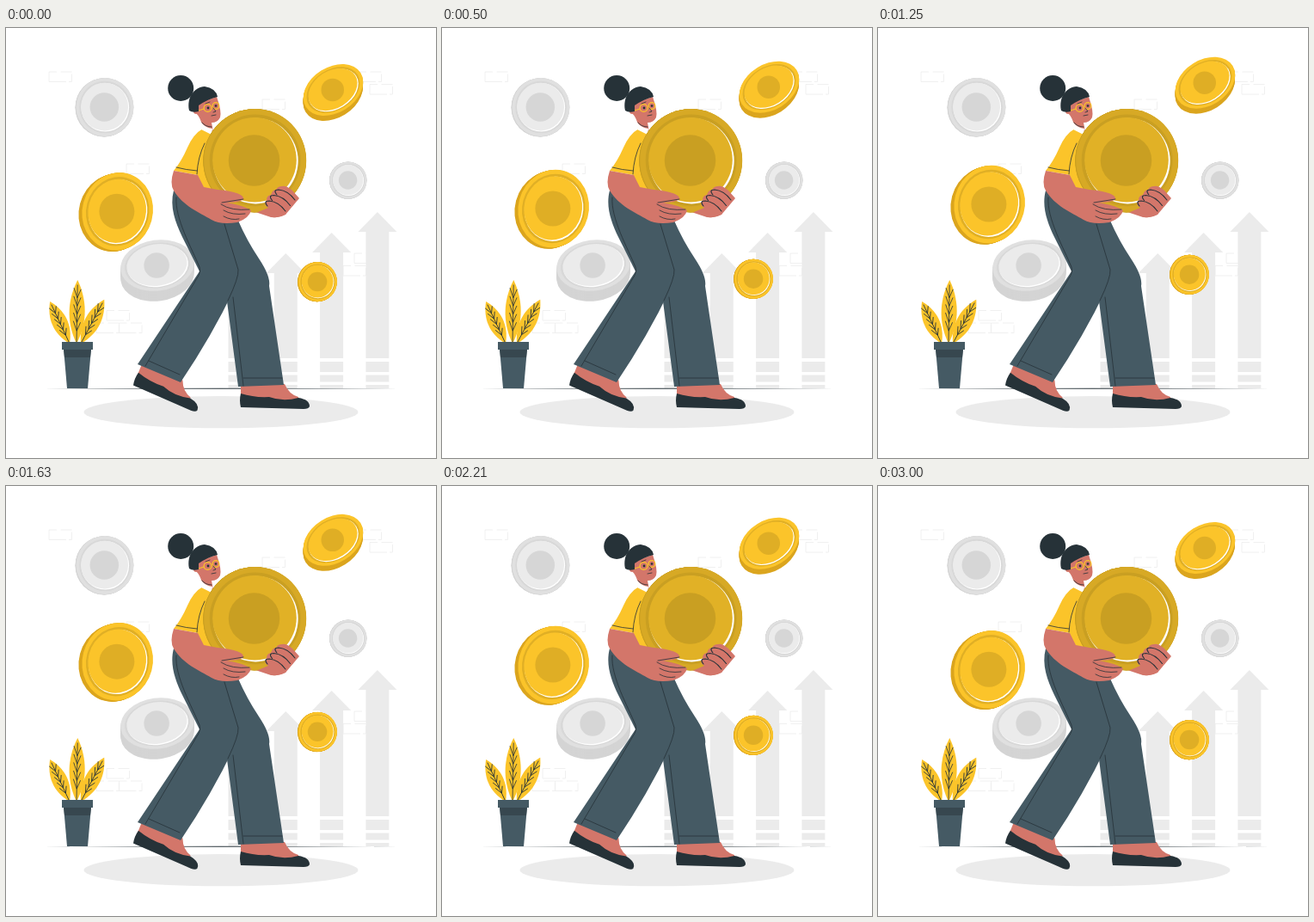
Recreate the animation shown at these times as an HTML page. Size 500 by 500 pixels, loop 3040 ms.

```html
<!DOCTYPE html>
<html lang="en">
<head>
<meta charset="utf-8">
<title>Carrying coins</title>
<style>
html, body { margin: 0; width: 100%; height: 100%; overflow: hidden; background: #fff; }
svg { display: block; width: 100%; height: 100%; }
.line { fill: none; stroke: #263238; stroke-width: .8; stroke-linecap: round; stroke-linejoin: round; }
.dark { fill: #263238; }
.skin { fill: #d3766a; }
.gold { fill: #fbc42a; }
.slate { fill: #455a64; }
.pale { fill: #ebebeb; }
</style>
</head>
<body>
<svg viewBox="0 0 500 500">
  <g id="bricks" fill="none" stroke="#ededed" stroke-width=".8"></g>
  <g id="arrows" class="pale"></g>
  <ellipse class="pale" cx="250" cy="446.7" rx="159.5" ry="18.6"/>
  <path class="dark" d="M43 419.2 250 418.8 457 419.2 250 419.7Z"/>
  <g id="greys"></g>

  <g id="leaves"></g>
  <path class="slate" d="M67 373H99L95 419H71Z"/>
  <path fill="#37474f" d="M67 373H99L98 383H68Z"/>
  <path class="slate" d="M65 365H101V374H65Z"/>

  <g id="floating"></g>

  <g id="foot">
    <path class="skin" d="M273 414H324Q329 426 340 429V436H273Z"/>
    <path class="dark" d="M273 425Q289 430 306 429Q322 435 340 430Q353 432 353 440Q352 443 346 443L273 441Q271 433 273 425Z"/>
  </g>
  <use href="#foot" transform="translate(148 415.5) rotate(22) translate(-273 -441)"/>

  <g id="legs">
    <path class="slate" d="M228 215 270 224Q280 247 294 268T306 300L323 415 270 417 257 318Z"/>
    <path class="slate" d="M195 189C190 208 197 226 205 243L225 283 153 391 203 412Q240 357 265 304Q272 290 269 277L254 226Z"/>
    <path class="line" d="M198 197C196 221 216 256 225 278Q227 284 222 291L162 393M166 387 202 403M254 228 270 281Q271 290 258 317M264 313 276 416M276 407H321"/>
  </g>

  <g id="head">
    <path class="skin" d="M222 88 245 80Q251 97 249 104Q246 110 239 110L241 121 228 113Q226 104 221 99Z"/>
    <circle class="skin" cx="221" cy="97" r="3"/>
    <circle class="dark" cx="203.200" cy="70" r="15"/>
    <path class="dark" d="M213 96C210 80 219 69 231 68Q244 70 246 80Q234 83 224 90V97Q217 99 213 96Z"/>
    <g fill="none" stroke="#fbc42a" stroke-width="1.300">
      <circle cx="234.500" cy="93" r="4.400"/><circle cx="244" cy="90.500" r="3.800"/>
      <path d="M224 96 230 94"/>
    </g>
    <circle class="dark" cx="235" cy="93" r="1.400"/><circle class="dark" cx="244" cy="90.500" r="1.300"/>
    <path class="line" d="M241 93 244 97 241 98M239 102 244 101M232 88 237 86"/>
  </g>

  <path class="gold" d="M238 120 229 117Q218 123 211 139T195 166L223 171V181Q232 190 249 191L254 130Z"/>
  <path fill="#fff" d="M227 110Q232 116 240 117L239 124 227 118Z"/>
  <path class="line" d="M228 110Q232 115 239 115M231 134Q223 150 222 170M198 162Q209 165 222 166"/>

  <path class="skin" d="M295 207H325L326 216Q319 221 308 220L290 214Z"/>
  <g id="held"></g>
  <path class="skin" d="M195 166Q190 181 195 189C206 207 224 214 239 223Q249 229 269 226Q283 221 285 212Q275 206 257 203Q272 203 276 199Q277 191 246 188L230 185 223 171Z"/>
  <path class="line" d="M250 205Q262 213 283 211M253 212Q263 218 278 216M253 219Q262 224 271 222M251 203 276 199"/>
  <path class="skin" d="M321 184Q326 183 333 189L341 198 325 217Q318 221 310 220L293 214 305 209Q299 206 303 200Q303 195 308 194Q310 188 314 188Q316 184 321 184Z"/>
  <g id="fingers"></g>
</svg>
<script>
const $ = id => document.getElementById(id);
const each = (n, draw) => Array.from({ length: n }, (_, i) => draw(i)).join('');
const gold = { side: '#dba51e', rim: '#fbc42a', ring: '#e0af25', face: '#fbc42a', mark: '#dfae25' };
const grey = { side: '#d4d4d4', rim: '#e0e0e0', ring: '#d8d8d8', face: '#ebebeb', mark: '#d6d6d6' };
const shade = { side: '#c99f22', rim: '#d7a925', ring: '#c99f22', face: '#e1b126', mark: '#c99f22' };

// A tilted disc: edge offset by (dx, dy), raised rim, glint and a plain round emblem.
function coin(c, x, y, rx, ry, tilt, dx, dy) {
  const s = rx / 50;
  const oval = (fill, k, ox = 0, oy = ox) =>
    `<ellipse rx="${rx * k}" ry="${ry * k}" fill="${fill}" transform="translate(${x + ox} ${y + oy}) rotate(${tilt})"/>`;
  return each(6, i => oval(c.side, 1, dx * (1 - i / 6), dy * (1 - i / 6))) +
    oval(c.rim, 1) + oval(c.ring, .89) + oval('#fff', .83, .5 * s) + oval(c.face, .82, -.6 * s) +
    `<circle cx="${x - s}" cy="${y}" r="${Math.min(rx, ry) / 2}" fill="${c.mark}"/>`;
}

// A pointed leaf of a given length, with a midrib and paired veins.
function leaf(x, length, angle) {
  const at = t => -t * length;
  const veins = each(5, i => {
    const t = .2 + i * .13;
    return `M-4 ${at(t + .15)}L0 ${at(t)} 4 ${at(t + .13)}`;
  });
  return `<g transform="translate(${x} 367) rotate(${angle})">
    <path class="gold" d="M0 0C-13 ${at(.35)} -11 ${at(.7)} 0 ${at(1)}C11 ${at(.7)} 13 ${at(.35)} 0 0Z"/>
    <path class="line" d="M0 0V${at(.92)}${veins}"/></g>`;
}

const brick = (x, y) => `<path d="M${x + 9} ${y}h-9v11.500h20m3 0h3.500v-9m0-2.500h-13"/>`;
// One brick, plus others in the row below shifted by the given steps.
const wall = (x, y, ...steps) => brick(x, y) + steps.map(step => brick(x + step, y + 14.500)).join('');

$('bricks').innerHTML = wall(50, 51) + wall(298, 83) + wall(140, 158) +
  wall(410, 51, 13) + wall(405, 262, -13) + wall(117, 328.500, -12, 14.500);

$('arrows').innerHTML = each(4, i => {
  const x = 272 + 53.300 * i, y = 286 - 24 * i;
  const bars = each(3, k => `<rect x="${x - 13.500}" y="${388 + 17.500 * k - 2 * k * k}" width="27" height="${12 - 4 * k}"/>`);
  return `<path d="M${x} ${y}l22.500 23h-9V384h-27V${y + 23}h-9Z"/>${bars}`;
});

$('leaves').innerHTML = leaf(74, 54, -25) + leaf(87, 58, 28) + leaf(82, 74, 1);

$('greys').innerHTML =
  coin(grey, 115, 92, 33.500, 34, 0, -1, .5) +
  coin(grey, 398, 177, 21.500, 21.500, 0, -.5, .3) +
  coin(grey, 176, 276, 43, 29.500, -8, 0, 12);

$('floating').innerHTML =
  coin(gold, 129.700, 213.300, 41, 45.500, 15, -4, 1.500) +
  coin(gold, 380.500, 72, 37.500, 26.500, -32, -.3, 6) +
  coin(gold, 362.500, 295, 22.500, 23, 0, -1, .3);

$('held').innerHTML = coin(shade, 289.700, 154, 59.500, 60, 0, -1, .4);

$('fingers').innerHTML = each(3, i =>
  `<path class="line" style="stroke-width:1.1" transform="translate(${5.500 * i} ${-6.500 * i})" d="M304 207Q299 201 306 201Q317 202 325 213"/>`);

// Linear rise and fall over three seconds, then a short rest.
function draw(now) {
  const t = Math.min(now % 3040, 3000) / 1500;
  $('floating').setAttribute('transform', `translate(0 ${-10 * (1 - Math.abs(1 - t))})`);
  requestAnimationFrame(draw);
}
draw(performance.now());
</script>
</body>
</html>
```
